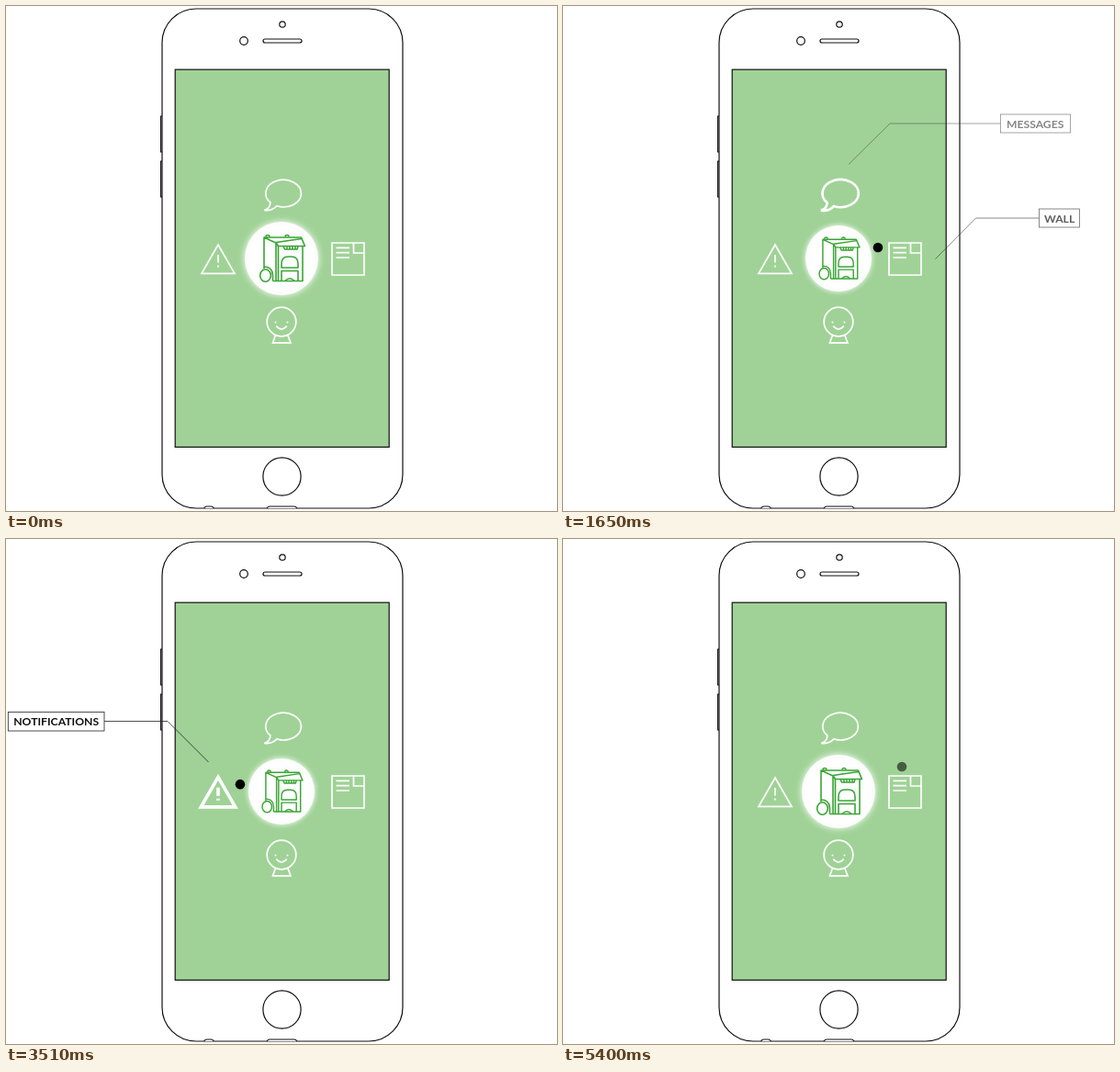
Recreate the animation shown at these times as an HTML page. Size 600 px wide and 550 px high, loop 5.43 s.

```html
<!DOCTYPE html>
<html lang="en">
<head>
<meta charset="utf-8">
<title>Radial menu</title>
<style>
  html, body { margin: 0; width: 100%; height: 100%; overflow: hidden; background: #fff; }
  svg { display: block; width: 600px; height: 550px; }
  .phone { fill: #fff; stroke: #111; stroke-width: 1.2; }
  .icon { fill: none; stroke: #fff; stroke-width: 1.7; }
  .icon .solid { fill: #fff; stroke: none; }
  .bin { fill: none; stroke: #3aa535; stroke-width: 1.6; stroke-linejoin: round; }
  .label { opacity: 0; }
  .label path, .label rect { fill: none; stroke: #222; stroke-width: .8; }
  .label rect { fill: #fff; }
  .label text { font: 700 12.2px Lato, sans-serif; text-anchor: middle; fill: #111; }
</style>
</head>
<body>
<svg viewBox="0 0 600 550">
  <defs>
    <clipPath id="screen"><rect x="184" y="69" width="233" height="411"/></clipPath>
    <filter id="glow" x="-30%" y="-30%" width="160%" height="160%"><feGaussianBlur stdDeviation="3"/></filter>
  </defs>

  <g class="phone">
    <path d="M170 120h-1.4v39h1.4M170 169h-1.4v39h1.4"/>
    <rect x="170" y="3" width="262" height="544" rx="37"/>
    <path d="M215.500 547q1.500 -2 3 -2h5q1.500 0 3 2M284 547q1.500 -2 3 -2h27q1.500 0 3 2"/>
    <circle cx="301" cy="20" r="3.200"/>
    <circle cx="259" cy="38" r="4.300"/>
    <rect x="280" y="36" width="42" height="4" rx="2"/>
    <circle cx="300.500" cy="512.500" r="20.600"/>
    <rect x="184.200" y="69.200" width="233" height="411.200" style="fill:#a0d297"/>
  </g>

  <g class="icon" id="messagesIcon">
    <path d="M288 214.200C287.500 218.500 285 221.500 281.300 222.300C287 223.200 291.500 221.500 294.800 217.800A19.300 14.800 0 1 0 288 214.200Z"/>
  </g>
  <g class="icon" id="wallIcon">
    <path d="M355 258h35v35h-35zM378.500 258v11h11.500M359.500 263.300h14.500M359.500 268.600h14.500M359.500 274h14.500"/>
  </g>
  <g class="icon" id="profileIcon">
    <circle cx="300" cy="344" r="15.800"/>
    <path d="M294.300 348.500Q300 355.500 305.700 348.500M293.500 358.500L290.500 366.800H310L306.800 358.500"/>
    <circle class="solid" cx="293.500" cy="344.500" r="1"/>
    <circle class="solid" cx="306.500" cy="344.500" r="1"/>
  </g>
  <g class="icon" id="notificationsIcon">
    <path d="M231 260L249 291.300H213ZM231 271v8.500M231 282.500v2"/>
  </g>

  <g id="bin">
    <circle cx="300" cy="275" r="41" fill="#fff" opacity=".8" filter="url(#glow)"/>
    <circle cx="300" cy="275" r="40" fill="#fff" opacity=".9"/>
    <g class="bin">
      <path d="M281 286V252L294 258V299.500M281 252H321.500L325.500 261.500H296.500L294 257.500L321.500 253.500"/>
      <path d="M296.500 261.500V299.500H323V261.500M290.500 299.500H297"/>
      <path d="M302 261.500L303.500 265H317L318 261.500M306 261.500v3M309 261.500v3M312 261.500v3M315 261.500v3"/>
      <path d="M300 285V281Q300 273 307 273H311Q318 273 318 281V285Z"/>
      <path d="M300 299.500V288.500H318V299.500M304 299.500Q309 294 314 299.500"/>
      <path d="M281 284Q290 284 290.500 293V299.500M283 251.500a2 2 0 0 1 4 0M304 251.500a2 2 0 0 1 4 0"/>
      <ellipse cx="282.500" cy="293.500" rx="5.800" ry="6.800"/>
    </g>
  </g>

  <g class="label" id="messagesLabel">
    <path d="M476.500 128H356L311 172.500"/>
    <rect x="476.500" y="118" width="76" height="20"/>
    <text x="514.200" y="132.600">MESSAGES</text>
  </g>
  <g class="label" id="wallLabel">
    <path d="M518.500 231H449.500L405.500 275.500"/>
    <rect x="518.500" y="221" width="44" height="20"/>
    <text x="540.600" y="235.600">WALL</text>
  </g>
  <g class="label" id="profileLabel">
    <path d="M108 429.500H253L297 385"/>
    <rect x="45.500" y="419" width="62.500" height="20.300"/>
    <text x="76" y="433.800">PROFILE</text>
  </g>
  <g class="label" id="notificationsLabel">
    <path d="M107 198.500H176L220.500 243"/>
    <rect x="2.300" y="188.500" width="104.700" height="20.500"/>
    <text x="54.700" y="203.200">NOTIFICATIONS</text>
  </g>

  <g clip-path="url(#screen)"><circle id="dot" r="5.300"/></g>
</svg>

<script>
const LOOP = 5430, STEP = 30, PRESS = 660, RELEASED = 4230;
const CENTER = { x: 300, y: 275 };
const byId = id => document.getElementById(id);
const linear = u => u;
const easeIn = u => u * u;
const easeOut = u => u * (2 - u);
const smooth = u => u * u * (3 - 2 * u);

// Each step is [time, values, easing towards this step].
function sample(steps, t) {
  const next = steps.findIndex(step => step[0] > t);
  if (next === 0) return steps[0][1];
  if (next < 0) return steps[steps.length - 1][1];
  const [t0, from] = steps[next - 1];
  const [t1, to, ease = linear] = steps[next];
  const u = ease((t - t0) / (t1 - t0));
  return from.map((v, i) => v + (to[i] - v) * u);
}

const pulse = ([in0, in1, out0, out1]) => [[in0, [0]], [in1, [1]], [out0, [1]], [out1, [0]]];

// Angle in degrees clockwise from the top, and distance from the bin.
const orbit = [
  [780, [-4, 14]],
  [978, [0, 44], smooth],
  [1650, [74.4, 44.6]],
  [2400, [157.1, 48.8]],
  [3510, [279.9, 45.7]],
  [4030, [318.9, 92.8], easeOut]
];
const glide = [
  [RELEASED, [239, 205]],
  [4770, [177, 144], easeIn],
  [4771, [424, 241.5]],
  [5220, [424, 241.5]],
  [5400, [369, 248]],
  [5880, [299, 261], easeOut]
];
const dotAlpha = [[PRESS, [.56]], [900, [1]], [3780, [1]], [4030, [.56]]];
const binScale = [[780, [1]], [960, [.9], smooth], [3800, [.9]], [4030, [1], smooth]];

const items = [
  { name: "messages", x: 300, y: 205, label: [930, 1130, 1560, 1740], bold: [960, 1130, 1560, 1740] },
  { name: "wall", x: 372.5, y: 275.5, label: [1530, 1710, 2265, 2435], bold: [1680, 1810, 2400, 2580] },
  { name: "profile", x: 300, y: 347, label: [2240, 2420, 3010, 3190], bold: [2480, 2620, 3060, 3240] },
  { name: "notifications", x: 231, y: 276, label: [3000, 3180, 3800, 4080], bold: [3240, 3380, 3780, 3980] }
].map(item => ({
  ...item,
  label: pulse(item.label),
  bold: pulse(item.bold),
  labelNode: byId(item.name + "Label"),
  iconNode: byId(item.name + "Icon")
}));

const scaleAbout = (x, y, s) => `translate(${x} ${y}) scale(${s}) translate(${-x} ${-y})`;

function dotPosition(t) {
  if (t >= RELEASED) return sample(glide, t);
  const [degrees, radius] = sample(orbit, t);
  const a = degrees * Math.PI / 180;
  return [CENTER.x + radius * Math.sin(a), CENTER.y - radius * Math.cos(a)];
}

function render(time) {
  const now = Math.floor(time % LOOP / STEP) * STEP;
  const t = now < PRESS ? now + LOOP : now;   // the approach runs across the loop seam

  for (const item of items) {
    const [bold] = sample(item.bold, t);
    item.labelNode.style.opacity = sample(item.label, t)[0];
    item.iconNode.style.strokeWidth = 1.7 + 1.8 * bold;
    item.iconNode.setAttribute("transform", scaleAbout(item.x, item.y, 1 + .04 * bold));
  }
  byId("bin").setAttribute("transform", scaleAbout(CENTER.x, CENTER.y, sample(binScale, t)[0]));

  const dot = byId("dot");
  const [x, y] = dotPosition(t);
  dot.setAttribute("cx", x);
  dot.setAttribute("cy", y);
  dot.style.opacity = now < STEP ? 0 : sample(dotAlpha, t)[0];
}

const start = performance.now();
function tick() {
  render(performance.now() - start);
  requestAnimationFrame(tick);
}
tick();
</script>
</body>
</html>
```
